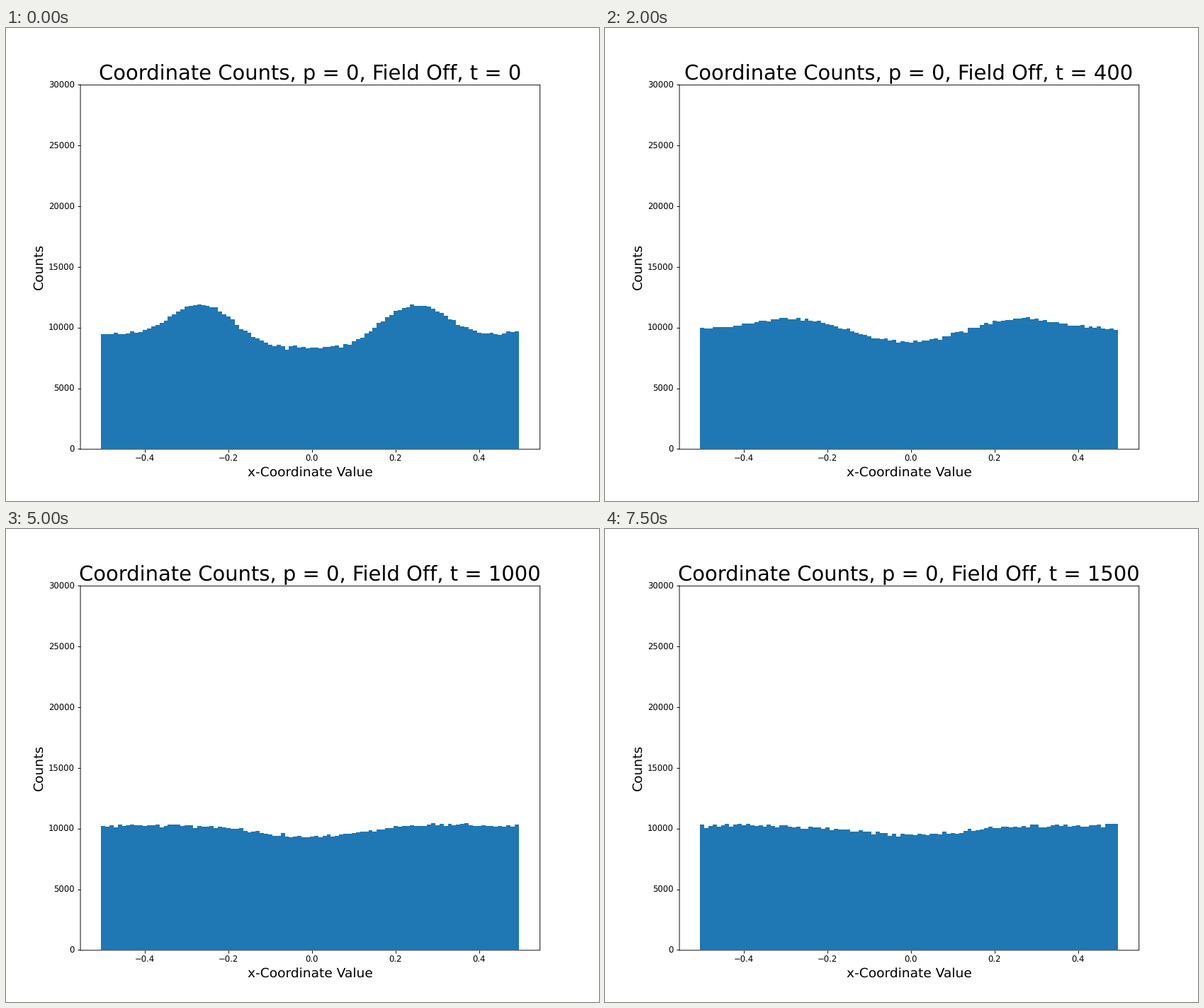
Write a matplotlib script that moves like this. It is 837 px wide and 669 px high and loops after 8000 ms.

```python
import numpy as np
import matplotlib.pyplot as plt
from matplotlib.animation import FuncAnimation

FRAMES = 16
STEP = 100          # simulated time per frame
BINS = 100
CENTER = -0.01      # symmetry point of the distribution

x = -0.5 + np.arange(BINS) / BINS


def counts(i):
    """Periodic density relaxing by diffusion, plus sampling noise."""
    t = i * STEP
    phase = 2 * np.pi * (x - CENTER)
    slow = -600 * np.exp(-0.00033 * t)
    main = -1400 * np.exp(-0.0021 * t) - 60
    fast = 410 * np.exp(-0.006 * t)
    mean = (10000 + slow * np.cos(phase) + main * np.cos(2 * phase)
            + fast * np.cos(4 * phase))
    return mean + np.random.default_rng(40 + i).normal(0, 75, BINS)


def title(i):
    return f"Coordinate Counts, p = 0, Field Off, t = {i * STEP}"


plt.rcParams["font.family"] = "DejaVu Sans"
plt.rcParams["text.hinting"] = "no_hinting"

fig, ax = plt.subplots(figsize=(10, 7.993), dpi=83.7)
bars = ax.bar(x, counts(0), width=1 / BINS, color="#1f77b4")
ax.set_xlim(-0.555, 0.545)
ax.set_ylim(0, 30000)

# Soft box lines, shifted about half a pixel right and down
for side, shift in dict(left=-0.36, right=0.36, top=-0.36, bottom=0.36).items():
    ax.spines[side].set_position(("outward", shift))
    ax.spines[side].set_snap(False)

ax.set_xlabel("x-Coordinate Value", fontsize=16)
ax.set_ylabel("Counts", fontsize=16)
heading = ax.set_title(title(0), fontsize=25)


def update(i):
    for bar, height in zip(bars, counts(i)):
        bar.set_height(height)
    heading.set_text(title(i))
    return [*bars, heading]


anim = FuncAnimation(fig, update, frames=FRAMES, interval=500,
                     repeat=True, repeat_delay=0, blit=False)
plt.show()
```
